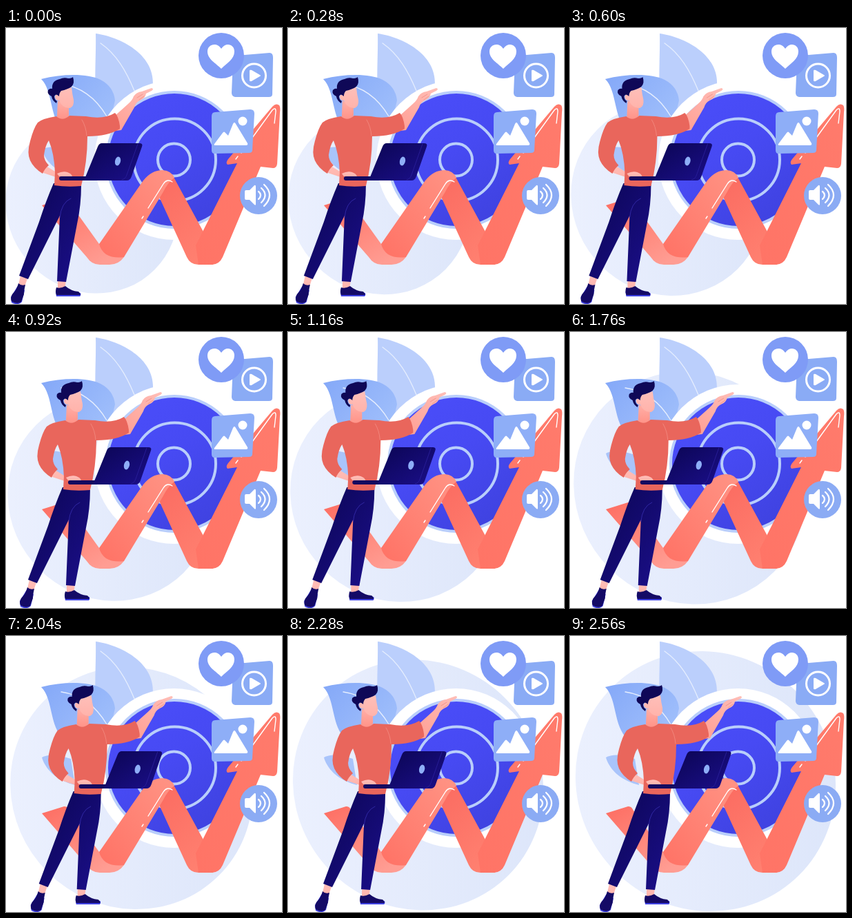
An HTML page for the animation above (2.6 s loop, 400 px wide and 400 px high).

```html
<!DOCTYPE html>
<html lang="en">
<head>
<meta charset="utf-8">
<style>
  html, body { margin: 0; width: 100%; height: 100%; overflow: hidden; background: #fff; }
  svg { display: block; width: 100vw; height: 100vh; }
  .line { fill: none; stroke-linecap: round; stroke-linejoin: round; }
</style>
</head>
<body>
<svg viewBox="0 0 400 400">
  <defs>
    <linearGradient id="blobFill" x1=".15" y1=".85" x2=".85" y2=".15"><stop stop-color="#ebf0fe"/><stop offset="1" stop-color="#dde6fa"/></linearGradient>
    <linearGradient id="leafFill" x2="1" y2=".7"><stop stop-color="#84a8f8"/><stop offset="1" stop-color="#a0bffb"/></linearGradient>
    <linearGradient id="discFill" x2=".7" y2="1"><stop stop-color="#4b4efb"/><stop offset=".5" stop-color="#474af3"/><stop offset="1" stop-color="#3f42e0"/></linearGradient>
    <linearGradient id="foldFill" x2=".7" y2="1"><stop stop-color="#fd6d62"/><stop offset=".5" stop-color="#ff8579"/><stop offset="1" stop-color="#ff9d93"/></linearGradient>
    <linearGradient id="downFill" x2=".6" y2="1"><stop stop-color="#fb6a60"/><stop offset="1" stop-color="#ff8070"/></linearGradient>
    <linearGradient id="upFill" x1="1" x2="0" y2="1"><stop stop-color="#ff9485"/><stop offset="1" stop-color="#ff7265"/></linearGradient>
    <linearGradient id="headFill" x1="1" x2="0" y2="1"><stop stop-color="#ff7b6c"/><stop offset="1" stop-color="#ff7466"/></linearGradient>
    <linearGradient id="skin" x2="0" y2="1"><stop stop-color="#ffbfb9"/><stop offset="1" stop-color="#ffb3ab"/></linearGradient>
    <linearGradient id="neckFill" x2="0" y2="1"><stop stop-color="#ffb0a8"/><stop offset="1" stop-color="#ff9287"/></linearGradient>
    <linearGradient id="armFill" x1="1" x2="0" y2="1"><stop stop-color="#ffbeb7"/><stop offset="1" stop-color="#ff9d92"/></linearGradient>
    <linearGradient id="navy" x2="1" y2="1"><stop stop-color="#0b0553"/><stop offset="1" stop-color="#1b0f8a"/></linearGradient>
  </defs>

  <ellipse id="blob" fill="url(#blobFill)"/>

  <!-- leaves -->
  <path fill="#bbcffc" d="M130 8C166 13 215 38 213 82L160 140L134 130C126 90 131 45 130 8Z"/>
  <path fill="#a9c4fb" d="M52 176Q66 168 94 178L100 216C76 210 58 196 52 176Z"/>
  <path fill="url(#leafFill)" d="M51 74C84 66 118 66 137 75Q156 85 158 105L150 140L84 150C62 130 69 92 51 74Z"/>
  <g class="line" stroke="#e6eefe" stroke-width="1.3">
    <path d="M137 22C160 38 174 62 186 91"/>
    <path d="M80 81C108 85 130 101 146 128"/>
  </g>

  <!-- target -->
  <circle cx="243.5" cy="191.5" r="115.5" fill="#fff"/>
  <g fill="none" stroke="#b9cefb" stroke-width="4">
    <circle cx="244" cy="191" r="98" fill="url(#discFill)"/>
    <circle cx="244.5" cy="191" r="59.5"/>
    <circle cx="243.5" cy="191" r="23.5"/>
  </g>

  <!-- zigzag arrow -->
  <path fill="url(#foldFill)" d="M52 257L84 247Q89 246 92 253L135 313L171 332Q163 343 150 343H136Q124 343 117 332Z"/>
  <path fill="url(#downFill)" d="M221 212Q237 204 244 218L306 332L300 343H279Q267 343 262 332L223 247Z"/>
  <path fill="url(#upFill)" d="M135 313L199 221Q211 206 227 206Q240 207 244 217Q235 223 227 239L171 332Q155 334 145 328Q137 322 135 313Z"/>
  <path fill="url(#headFill)" d="M275 315L335 196L321 198Q318 195 322 190L386 114Q391 108 396 112Q398 115 397 122L393 197Q392 203 387 203L369 201L314 332Q309 343 298 343H279Z"/>
  <g class="line" stroke="#fff" stroke-width="1.4">
    <path d="M197 276L199 273M206 261L228 226Q233 218 241 223"/>
    <path d="M333 190L336 186M341 181L386 119Q391 114 391 121L389 138"/>
  </g>

  <!-- media icons -->
  <path fill="#8aabf5" d="M334 40L382 36Q387 36 387 43L386 96Q386 100 381 100L332 100Q327 99 327 94L329 46Q330 40 334 40Z"/>
  <circle cx="359.5" cy="69" r="17" fill="none" stroke="#fff" stroke-width="3"/>
  <path fill="#fff" d="M353 62Q353 60 356 61L368 68Q370 69 368 70L356 77Q353 78 353 76Z"/>
  <circle cx="312" cy="40" r="33" fill="#7f9bf6"/>
  <path fill="#fff" d="M312 59C304 51 292 45 292 34C292 23 306 20 312 30C318 20 331 23 331 34C331 45 320 51 312 59Z"/>
  <path fill="#8eaef7" d="M303 122L354 118Q360 118 360 124L357 177Q357 181 352 181L302 182Q298 182 298 177V128Q298 122 303 122Z"/>
  <path fill="#fff" d="M303 170Q301 170 302 168L314 152Q316 149 318 152L322 156L329 139Q331 135 333 139L350 167Q351 170 348 170Z"/>
  <circle cx="343" cy="135" r="6.5" fill="#fff"/>
  <circle cx="366" cy="243" r="27" fill="#8babf4"/>
  <path fill="#fff" d="M348 235H353L360 228Q362 227 362 230V255Q362 258 360 256L353 249H348Q346 249 346 247V237Q346 235 348 235Z"/>
  <path class="line" stroke="#fff" stroke-width="2.3" d="M366 237Q372 242 366 248M370 232Q381 242 370 253M374 227Q390 242 374 258"/>

  <g id="man">
    <!-- feet -->
    <path fill="url(#skin)" d="M21 359L31 363L27 375L18 372ZM75 366H87L85 379H75Z"/>
    <path fill="#3f42e4" d="M7 390L8 398Q17 403 23 397L27 380L18 372ZM72 382L73 389H107Q109 388 108 384Z"/>
    <path fill="#140a66" d="M18 370Q22 374 28 372Q26 380 26 386L22 397Q16 401 8 396Q6 391 9 386Q16 379 18 370ZM73 376Q79 378 86 374Q94 381 105 382Q108 384 108 387H73Q71 382 73 376Z"/>
    <!-- trousers -->
    <path fill="url(#navy)" d="M69 225L109 227Q109 257 103 284L87 368L74 367L78 272L32 364L19 359L48 281Q58 250 69 225Z"/>
    <path class="line" stroke="#382fb0" stroke-width=".8" d="M78 275Q80 253 94 247"/>
    <!-- pointing arm -->
    <path fill="url(#armFill)" d="M157 128L177 110Q183 105 185 99Q189 93 197 92L211 87Q215 88 211 91L203 95Q202 102 194 105Q188 108 186 115L167 148L150 150Z"/>
    <path class="line" stroke="#ee8d84" stroke-width=".8" d="M190 101L198 96M193 104L200 99"/>
    <!-- resting arm -->
    <path fill="url(#skin)" d="M55 198L76 211Q82 208 88 209L96 214L92 217H75L51 209Z"/>
    <!-- head -->
    <path fill="url(#neckFill)" d="M75 105L74 127Q72 132 82 133Q91 132 91 126V114Z"/>
    <path fill="url(#skin)" d="M77 92Q86 88 95 86Q96 96 98 104Q99 113 93 116Q82 117 77 105Q71 105 71 99Q73 94 77 98Z"/>
    <path fill="#0f0857" d="M97 71Q100 80 95 85Q89 89 80 91Q77 94 77 99Q72 94 70 99Q70 104 74 106L73 109Q67 105 66 99Q59 96 61 90Q64 87 67 88Q66 76 78 74Q84 71 90 73Q95 73 97 71Z"/>
    <!-- shirt -->
    <path fill="#e9665c" d="M73 128Q82 136 92 127L116 128Q142 133 158 123Q163 128 165 142L165 146Q148 157 118 157Q118 195 109 229Q88 231 70 228L71 210Q70 182 62 163Q57 170 55 184Q55 192 62 199Q56 204 53 211Q40 203 35 192Q30 181 35 164Q40 145 46 137Q53 131 73 128Z"/>
    <path class="line" stroke="#f2897f" stroke-width=".9" d="M110 133Q116 143 117 156"/>
    <!-- laptop -->
    <path fill="#140a60" d="M80 215H122V221H80Q77 221 77 218Q77 215 80 215Z"/>
    <path fill="url(#navy)" d="M139 167H193Q199 167 197 172L182 215Q180 221 175 221H113L133 172Q135 167 139 167Z"/>
    <path class="line" stroke="#2c219d" stroke-width=".8" d="M191 168L175 213Q173 219 168 220"/>
    <ellipse cx="162" cy="193" rx="4" ry="6.5" fill="#8eaef7" transform="rotate(14 162 193)"/>
    <path fill="url(#skin)" d="M74 211Q82 207 89 209Q95 211 96 215H77Z"/>
  </g>
</svg>
<script>
  const DURATION = 2600, STEP = 40, LAST = DURATION / STEP - 1;
  const blob = document.getElementById("blob");
  const man = document.getElementById("man");
  const mix = (a, b, p) => a + (b - a) * p;

  function draw(now) {
    const p = Math.floor((now % DURATION) / STEP) / LAST;
    const radius = mix(124.5, 188, p);
    blob.setAttribute("rx", radius + 4);
    blob.setAttribute("ry", radius - 3);
    blob.setAttribute("transform",
      `translate(${mix(124.5, 196.5, p)} ${mix(259.5, 210.5, p)}) rotate(45)`);
    man.setAttribute("transform", `translate(${36 * p} 0)`);
  }

  let start;
  function tick(now) {
    start ??= now;
    draw(now - start);
    requestAnimationFrame(tick);
  }
  draw(0);
  requestAnimationFrame(tick);
</script>
</body>
</html>
```
